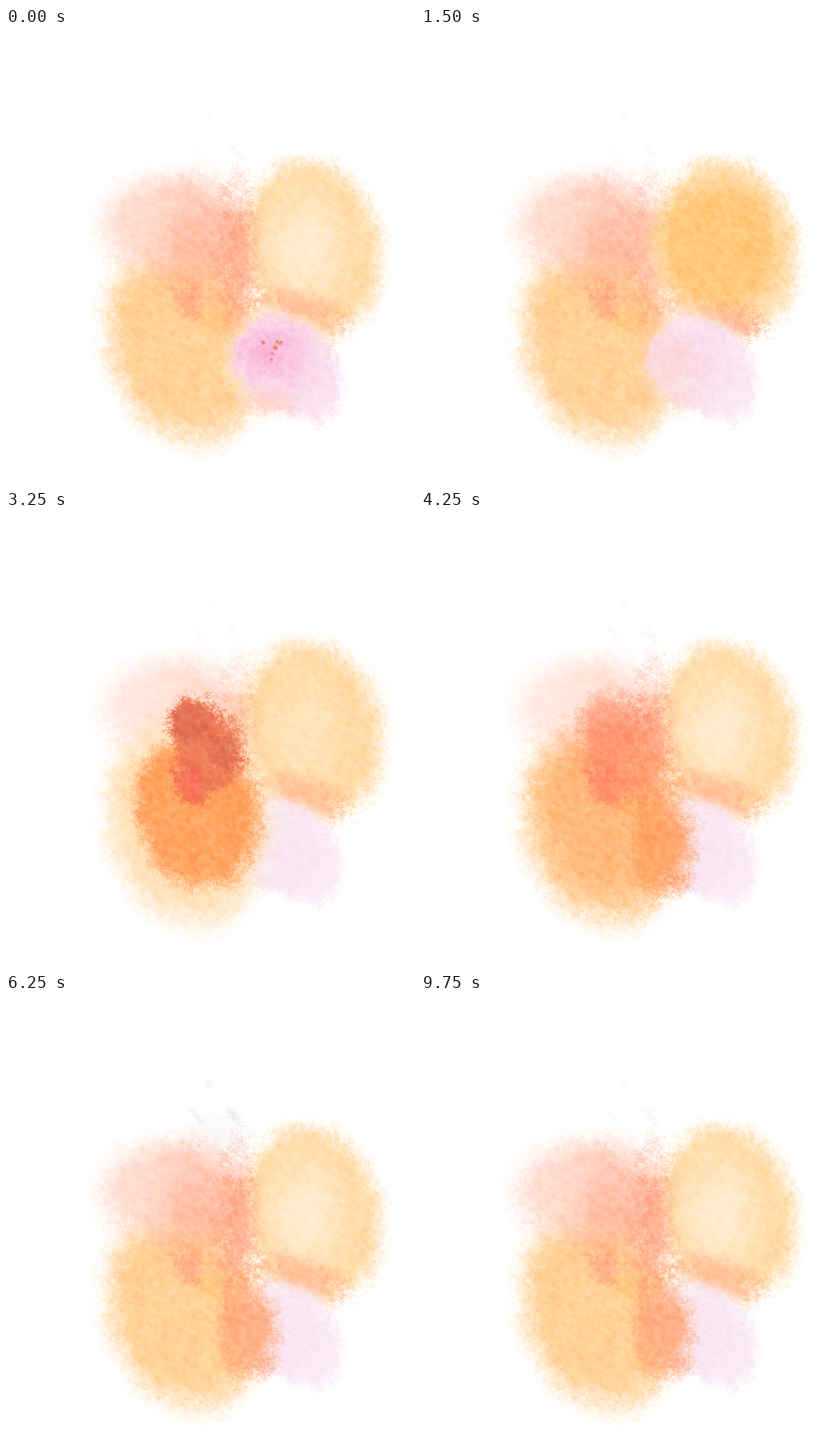
An HTML page with a canvas that plays this animation: 420x468 px, repeating every 10000 ms.

```html
<!DOCTYPE html>
<html lang="en">
<head>
<meta charset="utf-8">
<title>Watercolour blooms</title>
<style>
html, body { margin: 0; width: 100%; height: 100%; overflow: hidden; background: #fff; }
canvas { display: block; width: 420px; height: 468px; }
</style>
</head>
<body>
<canvas id="c" width="420" height="468"></canvas>
<script>
const W = 420, H = 468, LOOP = 10000, STEP = 250;
const ctx = document.getElementById('c').getContext('2d');
const img = ctx.createImageData(W, H);
const buf = new Float32Array(W * H * 3);

const GOLD = [255, 204, 138], SAND = [255, 214, 154], CREAM = [255, 241, 220],
  PEACH = [255, 211, 194], CORAL = [255, 162, 128], STAIN = [255, 168, 120],
  AMBER = [255, 197, 116], ORANGE = [255, 159, 90], RED = [238, 122, 86], DARK = [222, 106, 82],
  LILAC = [249, 230, 243], PINK = [252, 196, 226], ROSE = [248, 170, 208],
  RIM = [255, 229, 190], GREY = [224, 226, 226];

// noise in -1..1
function hash(x, y, s) {
  let h = Math.imul(x, 374761393) + Math.imul(y, 668265263) + Math.imul(s, 974634777);
  h = Math.imul(h ^ (h >>> 13), 1274126177);
  return ((h ^ (h >>> 16)) >>> 0) / 2147483648 - 1;
}
const smooth = v => v * v * (3 - 2 * v);

function noise(x, y, s) {
  const i = Math.floor(x), j = Math.floor(y), u = smooth(x - i), v = smooth(y - j);
  const a = hash(i, j, s), b = hash(i + 1, j, s), c = hash(i, j + 1, s), d = hash(i + 1, j + 1, s);
  return (a + (b - a) * u) * (1 - v) + (c + (d - c) * u) * v;
}

function field(fn) {
  const f = new Float32Array(W * H);
  for (let y = 0; y < H; y++) for (let x = 0; x < W; x++) f[y * W + x] = fn(x, y);
  return f;
}
// ragged outlines, and the blotchy pigment inside
const edge = field((x, y) =>
  0.35 * noise(x / 14, y / 14, 1) + 0.4 * noise(x / 5, y / 5, 2) + 0.6 * noise(x / 1.5, y / 1.5, 3));
const grain = field((x, y) =>
  0.2 * noise(x / 15, y / 15, 4) + 0.45 * noise((x + y) / 9, (y - x) / 6, 5) + 0.3 * noise(x / 2.5, y / 2.5, 6));

const clamp = v => Math.min(1, Math.max(0, v));
const ramp = (t, a, b) => smooth(clamp((t - a) / (b - a)));
const pulse = (t, mid, width) => Math.exp(-(((t - mid) / width) ** 2));
const mix = (a, b, u) => a.map((v, i) => v + (b[i] - v) * u);

// a wet drop spreads fast, blurs, then dries away
function drop(t, start) {
  const age = Math.max(0, t - start) / 1000;
  return {
    size: 1 - Math.exp(-2.2 * age),
    wet: age ? Math.exp(-((age / 2.2) ** 3)) : 0,
    soft: 0.08 + 0.14 * age
  };
}

// soft ragged ellipse laid over what is already painted
function blob(cx, cy, rx, ry, rgb, alpha, soft = 0.3, rot = 0, rough = 9) {
  if (alpha < 0.005 || rx < 1 || ry < 1) return;
  const k = rough / Math.min(rx, ry), reach = Math.max(rx, ry) * (1 + soft + k * 1.35);
  const x0 = Math.max(0, Math.floor(cx - reach)), x1 = Math.min(W, Math.ceil(cx + reach));
  const y0 = Math.max(0, Math.floor(cy - reach)), y1 = Math.min(H, Math.ceil(cy + reach));
  const co = Math.cos(rot), si = Math.sin(rot);
  for (let y = y0; y < y1; y++) {
    for (let x = x0; x < x1; x++) {
      const dx = x - cx, dy = y - cy, i = y * W + x;
      const u = (dx * co + dy * si) / rx, v = (dy * co - dx * si) / ry;
      const m = (1 + soft + k * edge[i] - Math.sqrt(u * u + v * v)) / (2 * soft);
      if (m <= 0) continue;
      const a = alpha * (m >= 1 ? 1 : smooth(m)), o = i * 3;
      for (let c = 0; c < 3; c++) buf[o + c] += (rgb[c] - buf[o + c]) * a;
    }
  }
}

function smudges(t) {
  const a = 0.14 + 0.38 * pulse(t, 6900, 1600);
  blob(216, 145, 34, 20, GREY, 0.18 * pulse(t, 6400, 1200), 0.7);
  blob(208, 92, 4, 5, GREY, a * 0.7, 0.7, 0.5, 2);
  for (const x of [195, 233]) blob(x, 125, 3, 9, GREY, a, 0.7, -0.6, 2);
}

function leftWash(t) {
  const washed = pulse(t, 3800, 1100);
  blob(184, 322, 76, 101, GOLD, 0.9 - 0.3 * pulse(t, 3300, 800), 0.27, -0.28);
  blob(166, 202, 64, 49, PEACH, 0.8 - 0.35 * washed, 0.38);
  blob(205, 222, 42, 55, CORAL, 0.5 - 0.3 * washed, 0.75);
  blob(213, 300, 14, 12, AMBER, 0.6, 0.7);
}

function rightWash(t) {
  const { size, wet, soft } = drop(t, 500);
  blob(313, 226, 69, 87, SAND, 0.95, 0.22, -0.2);
  blob(308, 226, 40, 50, CREAM, 0.75 * (1 - wet), 0.85);
  blob(300, 290, 38, 16, CORAL, 0.5, 0.8, 0.3);
  // coral seam between the two wings
  blob(237, 238, 17, 58, CORAL, 0.8 - 0.5 * pulse(t, 2400, 1300), 0.85);
  blob(309, 226, 82 * size, 94 * size, RIM, wet * 0.8, 0.16, -0.2);
  blob(306, 224, 70 * size, 74 * size, AMBER, wet, soft + 0.1);
  blob(318, 299, 26, 11, CORAL, wet * 0.6, 0.8, 0.3);
}

function pinkWash(t) {
  const { size, wet, soft } = drop(t, -1000);
  const tint = mix(LILAC, PINK, wet * 0.35);
  blob(278, 341, 55, 52, RIM, wet * 0.8, 0.1);
  blob(281, 342, 48, 46, tint, 0.88, 0.17);
  blob(306, 362, 38, 42, tint, 0.8, 0.25, -0.6);
  blob(268, 383, 24, 16, PEACH, wet * 0.6, 0.6);
  blob(262, 348, 24, 26, PEACH, 0.6 * pulse(t, 2000, 900), 0.8);
  blob(274, 334, 43 * size, 41 * size, PINK, wet * 0.75, soft + 0.15);
  blob(268, 332, 22 * size, 21 * size, ROSE, wet ** 2 * 0.75, 0.7);
  for (let i = 0; i < 7; i++)
    blob(272 + 10 * hash(i, 0, 8), 332 + 10 * hash(i, 1, 8), 1.6, 1.6, RED, 0.8 * (1 - ramp(t, 0, 750)), 0.7, 0, 1);
}

function redDrop(t) {
  const { size, wet, soft } = drop(t, 2350), dried = ramp(t, 3250, 4250);
  // where orange has run into the pink
  blob(248, 345, 28, 44, mix(STAIN, ORANGE, wet), dried * 0.88, 0.5, -0.1);
  blob(192, 304, 92 * size, 112 * size, RIM, wet * 0.75 * (1 - dried), 0.2, -0.2);
  blob(196, 308, 73 * size, 90 * size, ORANGE, wet, soft, -0.2);
  const red = mix(RED, [255, 138, 104], dried);
  blob(193, 220, 32 * size, 34 * size, red, wet * 0.95, soft);
  blob(210, 248, 40 * size, 45 * size, red, wet * 0.9, soft);
  blob(193, 276, 24 * size, 31 * size, red, wet * 0.85, soft);
  const deep = 0.75 * pulse(t, 3100, 500);
  blob(189, 216, 20, 18, DARK, deep);
  blob(223, 250, 15, 19, DARK, deep);
  blob(190, 274, 11, 14, DARK, deep);
  blob(187, 278, 12, 15, mix(CORAL, [255, 110, 88], wet), 0.75, 0.8);
}

function paint(t) {
  buf.fill(255);
  smudges(t);
  leftWash(t);
  rightWash(t);
  pinkWash(t);
  redDrop(t);
  const d = img.data;
  for (let i = 0, n = W * H; i < n; i++) {
    for (let c = 0; c < 3; c++) {
      const v = buf[i * 3 + c];
      d[i * 4 + c] = v - (255 - v) * 0.36 * grain[i] * (v / 255);
    }
    d[i * 4 + 3] = 255;
  }
  ctx.putImageData(img, 0, 0);
}

const start = performance.now();
let last = -1;
function tick() {
  const t = Math.max(0, performance.now() - start) % LOOP;
  const step = Math.floor(t / STEP);
  if (step !== last) paint((last = step) * STEP);
  requestAnimationFrame(tick);
}
tick();
</script>
</body>
</html>
```
